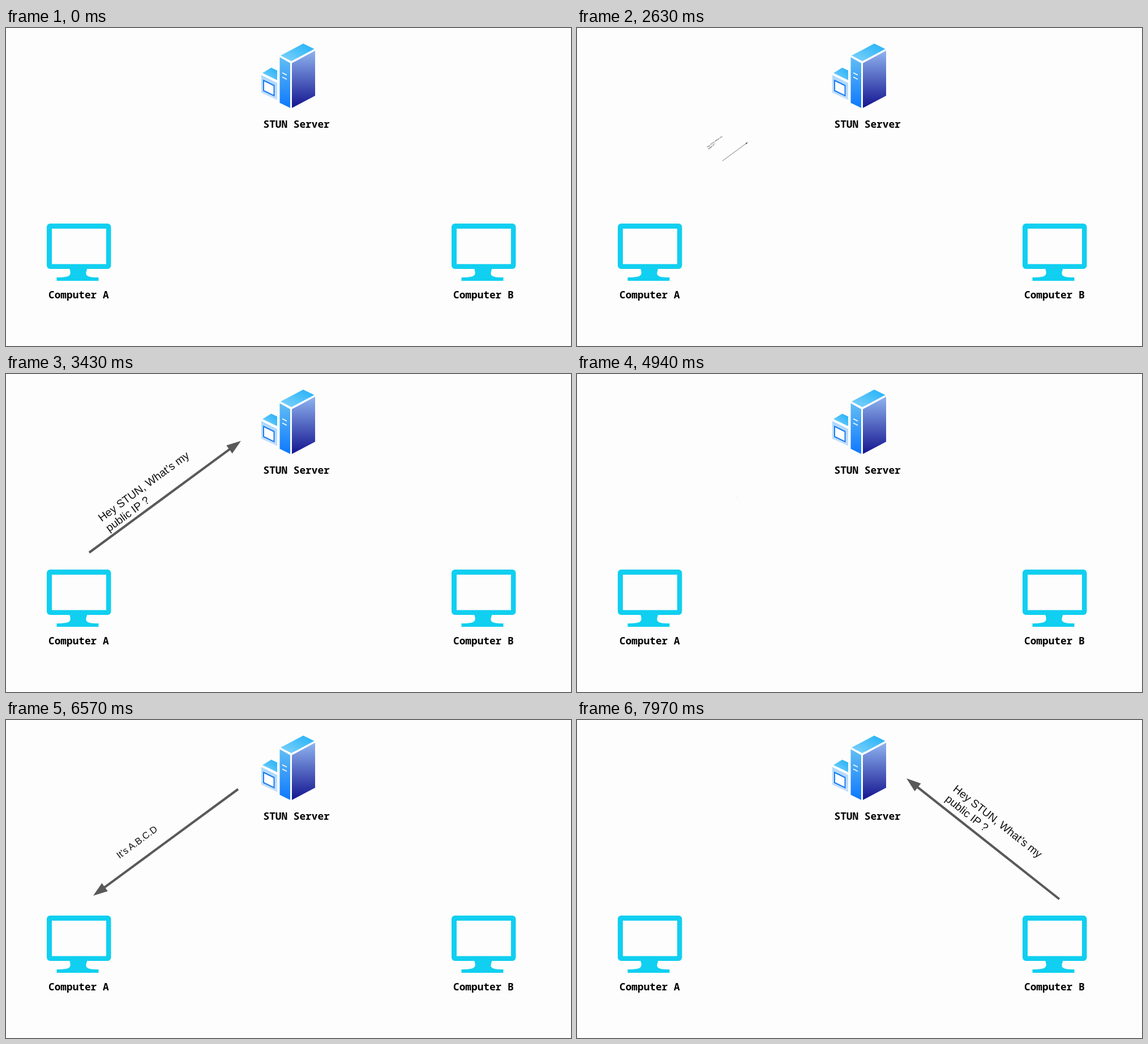
These frames come from a looping animation (998 px wide and 561 px high, 8000 ms). An HTML page:

```html
<!DOCTYPE html>
<html lang="en">
<head>
<meta charset="utf-8">
<title>STUN exchange</title>
<style>
  html, body { margin: 0; width: 100%; height: 100%; overflow: hidden; background: #fdfdfd; }
  svg { display: block; width: 998px; height: 561px; }
  .label { font: bold 17.78px "Noto Sans Mono", monospace; }
  .speech { font-family: "Liberation Sans", Arial, sans-serif; fill: #111; }
  .arrow { fill: #595959; }
</style>
</head>
<body>
<svg viewBox="0 0 998 561">
  <defs>
    <linearGradient id="lid" x1="1" y1="0" x2="0" y2="1">
      <stop stop-color="#1fb0f8"/><stop offset="1" stop-color="#83d3fa"/>
    </linearGradient>
    <linearGradient id="front" x2="0" y2="1">
      <stop stop-color="#62bdf2"/><stop offset="1" stop-color="#0d78ff"/>
    </linearGradient>
    <linearGradient id="side" x2="0" y2="1">
      <stop stop-color="#8fb4f0"/><stop offset="1" stop-color="#14148f"/>
    </linearGradient>
    <linearGradient id="box" x2="0" y2="1">
      <stop stop-color="#aad8fb"/><stop offset="1" stop-color="#c6dffc"/>
    </linearGradient>
    <g id="computer" fill="#10cff0">
      <path fill-rule="evenodd" d="M78 345H179.500a6 6 0 0 1 6 6V419a6 6 0 0 1-6 6H78a6 6 0 0 1-6-6V351a6 6 0 0 1 6-6ZM81 354V416.500H177V354Z"/>
      <path d="M112 424C114 430 116 436 108 438.500C102 440 96 440 89.500 440V446H163.500V440C157 440 150 440 145 438C139 435 142 430 143.500 424Z"/>
    </g>
  </defs>

  <!-- server -->
  <path fill="url(#lid)" d="M485 48.500L525 27.500L544.500 37L504 58.500Z"/>
  <path fill="url(#front)" d="M483.500 51.500L502 62V141L483.500 132Z"/>
  <path fill="url(#side)" d="M505 62L546 40V119.500L505 141Z"/>
  <path stroke="#fff" stroke-width="1.5" d="M488 79L496 83M488 86.500L496 90.500"/>
  <path fill="url(#lid)" d="M453 79.500L468.500 70L479 75V92Z"/>
  <path fill="url(#box)" d="M451 83L479 97V127L451 114Z"/>
  <path fill="#fff" stroke="#1b7bf0" stroke-width="2" d="M455 92.500L473.500 101.500V119.500L455 110.500Z"/>

  <use href="#computer"/>
  <use href="#computer" x="715"/>
  <text class="label" x="454.500" y="176">STUN Server</text>
  <text class="label" x="75" y="476.500">Computer A</text>
  <text class="label" x="790" y="476.500">Computer B</text>
  <g id="messages"></g>
</svg>
<script>
const LOOP = 8000, ZOOM = 600;
const question = ["Hey STUN, What’s my", "public IP ?"];

// Each message stays until the next one starts; arrow and text zoom about their own pivots.
const messages = [
  { start: 2530, tail: [147, 315], tip: [415, 118], arrowPivot: [279, 218.3],
    lines: question, size: 19.4, angle: -36.3, at: [169, 261], textPivot: [243, 201] },
  { start: 4928, tail: [410, 122], tip: [154, 310], arrowPivot: [284, 214.5],
    lines: ["It’s A.B.C.D"], size: 16.6, angle: -36.3, at: [200.5, 245], textPivot: [236, 213] },
  { start: 7168, tail: [852, 316], tip: [582, 103], arrowPivot: [720, 212],
    lines: question, size: 19.4, angle: 38.3, at: [663, 124], textPivot: [740, 180] },
];

function arrowMarkup({ tail, tip }) {
  const dx = tip[0] - tail[0], dy = tip[1] - tail[1];
  const length = Math.hypot(dx, dy), neck = length - 25.5;
  const angle = Math.atan2(dy, dx) * 180 / Math.PI;
  return `<path class="arrow" transform="translate(${tail}) rotate(${angle})"
    d="M0 -2.05H${neck}V-8.8L${length} 0L${neck} 8.800V2.050H0Z"/>`;
}

function textMarkup({ lines, size, angle, at }) {
  const rows = lines.map((line, i) => `<tspan x="0" y="${i * size * 1.15}">${line}</tspan>`).join("");
  return `<text class="speech" font-size="${size}" transform="translate(${at}) rotate(${angle})">${rows}</text>`;
}

const layer = document.getElementById("messages");
layer.innerHTML = messages.map(m =>
  `<g><g>${arrowMarkup(m)}</g><g>${textMarkup(m)}</g></g>`).join("");

const zoomAbout = ([x, y], scale) =>
  `translate(${x} ${y}) scale(${scale}) translate(${-x} ${-y})`;

function draw(time) {
  messages.forEach((m, i) => {
    const group = layer.children[i];
    const end = messages[i + 1]?.start ?? LOOP;
    const visible = time > m.start && time < end;
    group.style.display = visible ? "" : "none";
    if (!visible) return;
    const scale = Math.min(1, (time - m.start) / ZOOM);
    group.children[0].setAttribute("transform", zoomAbout(m.arrowPivot, scale));
    group.children[1].setAttribute("transform", zoomAbout(m.textPivot, scale));
  });
}

const begin = performance.now();
function tick() {
  draw((performance.now() - begin) % LOOP);
  requestAnimationFrame(tick);
}
tick();
</script>
</body>
</html>
```
